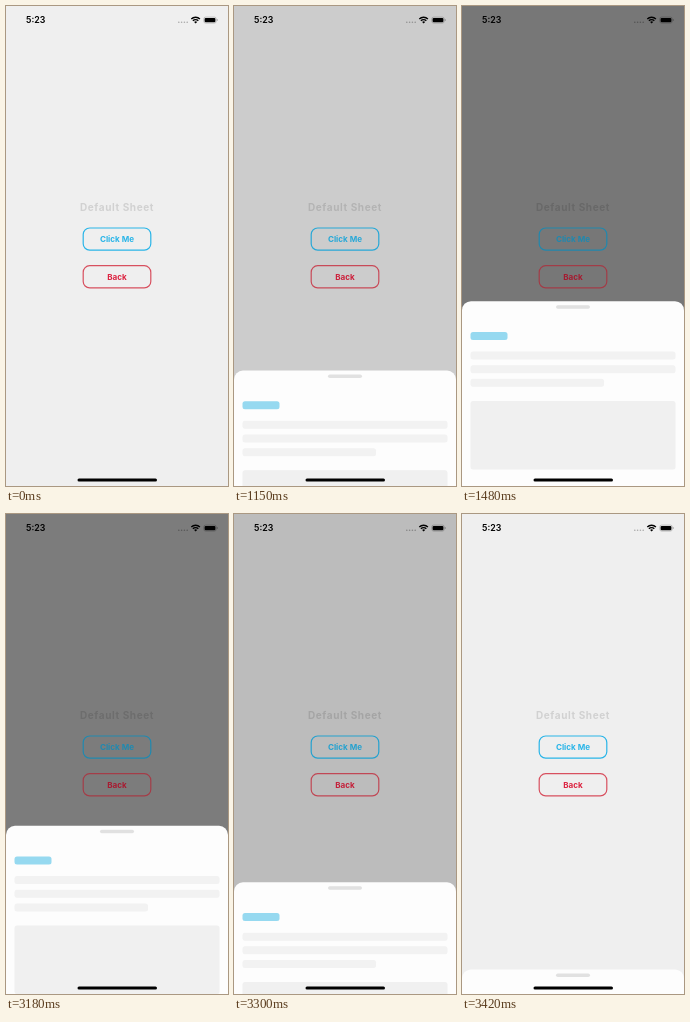
An HTML page that plays this animation: 222x480 px, repeating every 3450 ms.

```html
<!DOCTYPE html>
<html lang="en">
<head>
<meta charset="utf-8">
<title>Default Sheet</title>
<style>
  html, body { margin: 0; width: 100%; height: 100%; overflow: hidden; background: #efefef; }
  svg { display: block; width: 100vw; height: 100vh; }
  text { font: 700 8.1px Inter, sans-serif; text-anchor: middle; }
  .button rect { fill: none; stroke-width: 1.2; }
  .blue { fill: #2ab5e8; stroke: #2ab5e8; }
  .red { fill: #dc2340; stroke: #d8505f; }
  .button text { stroke: none; }
</style>
</head>
<body>
<svg viewBox="0 0 222 480">
  <rect width="222" height="480" fill="#efefef"/>

  <g id="status">
    <text x="29.7" y="17.3" style="font-size:8.8px;font-weight:600">5:23</text>
    <g fill="#a9a9a9">
      <circle cx="172.8" cy="16.2" r=".8"/>
      <circle cx="175.6" cy="16.2" r=".8"/>
      <circle cx="178.4" cy="16.2" r=".8"/>
      <circle cx="181.2" cy="16.2" r=".8"/>
    </g>
    <g fill="none" stroke="#000" stroke-width="1.4">
      <path d="M185.3 13 A6.1 6.1 0 0 1 193.9 13"/>
      <path d="M186.9 14.8 A3.8 3.8 0 0 1 192.3 14.8"/>
    </g>
    <path d="M189.6 17.4 L188.1 15.9 A2.1 2.1 0 0 1 191.1 15.9 Z"/>
    <rect x="197.8" y="11.1" width="12.4" height="6" rx="1.8" fill="none" stroke="#a0a0a0" stroke-width=".6"/>
    <rect x="198.6" y="11.9" width="10.8" height="4.4" rx="1.1"/>
    <rect x="210.8" y="13.1" width=".8" height="2" rx=".4" fill="#a0a0a0"/>
  </g>

  <text x="111" y="204.6" fill="#d1d1d1" style="font-size:10px;letter-spacing:.6px">Default Sheet</text>

  <rect id="shade" width="222" height="480" opacity="0"/>

  <g id="buttons">
    <g id="click" class="button blue">
      <rect x="77.2" y="222" width="67.6" height="22.2" rx="6.5"/>
      <text x="111" y="236">Click Me</text>
    </g>
    <g class="button red">
      <rect x="77.2" y="259.7" width="67.6" height="22.2" rx="6.5"/>
      <text x="111" y="273.6">Back</text>
    </g>
  </g>

  <g id="sheet" transform="translate(0 480)">
    <rect width="222" height="210" rx="9" fill="#fdfdfd"/>
    <rect x="94" y="4" width="34" height="3.5" rx="1.75" fill="#e1e1e1"/>
    <rect x="8.5" y="30.7" width="37" height="8" rx="2.5" fill="#96d9f0"/>
    <g fill="#f2f2f2">
      <rect x="8.5" y="50.3" width="205" height="8" rx="2.5"/>
      <rect x="8.5" y="64" width="205" height="8" rx="2.5"/>
      <rect x="8.5" y="77.6" width="133.5" height="8" rx="2.5"/>
      <rect x="8.5" y="99.7" width="205" height="68.5" rx="2.5" fill="#f0f0f0"/>
    </g>
  </g>

  <rect x="71.5" y="472.4" width="79.5" height="3" rx="1.5"/>
</svg>
<script>
const LOOP = 3450, STEP = 30;
const PRESS = 910, RELEASE = 970, OPEN = 1030, CLOSE = 3150;
const SHEET_TOP = 294.8, TRAVEL = 185.2;
const [shade, buttons, click, sheet] =
  ['shade', 'buttons', 'click', 'sheet'].map(id => document.getElementById(id));

const progress = (t, start, length) => Math.min(1, Math.max(0, (t - start) / length));
const easeInOut = x => x * x * (3 - 2 * x);

// Critically damped spring on the way in, accelerating slide on the way out.
function sheetOffset(t) {
  if (t <= OPEN) return TRAVEL;
  if (t <= CLOSE) {
    const x = (t - OPEN) * 0.0192;
    return t >= 1480 ? 0 : TRAVEL * (1 + x) * Math.exp(-x);
  }
  const u = t - CLOSE - STEP;
  return Math.min(TRAVEL, 17 + 0.344 * u + 0.00106 * u * u);
}

function shadeOpacity(t) {
  const shown = easeInOut(progress(t, OPEN, 310));
  const hidden = easeInOut(progress(t, CLOSE, 275));
  return 0.5 * (shown - hidden);
}

function clickOpacity(t) {
  return t < PRESS ? 1 : 0.2 + 0.8 * easeInOut(progress(t, RELEASE, 180));
}

function draw(now) {
  const t = Math.floor((now % LOOP) / STEP) * STEP;
  const dark = shadeOpacity(t);
  shade.setAttribute('opacity', dark);
  buttons.style.filter = dark ? `brightness(${1 - dark / 2})` : 'none';
  click.setAttribute('opacity', clickOpacity(t));
  sheet.setAttribute('transform', `translate(0 ${SHEET_TOP + sheetOffset(t)})`);
}

const start = performance.now();
function tick() {
  draw(performance.now() - start);
  requestAnimationFrame(tick);
}
tick();
</script>
</body>
</html>
```
